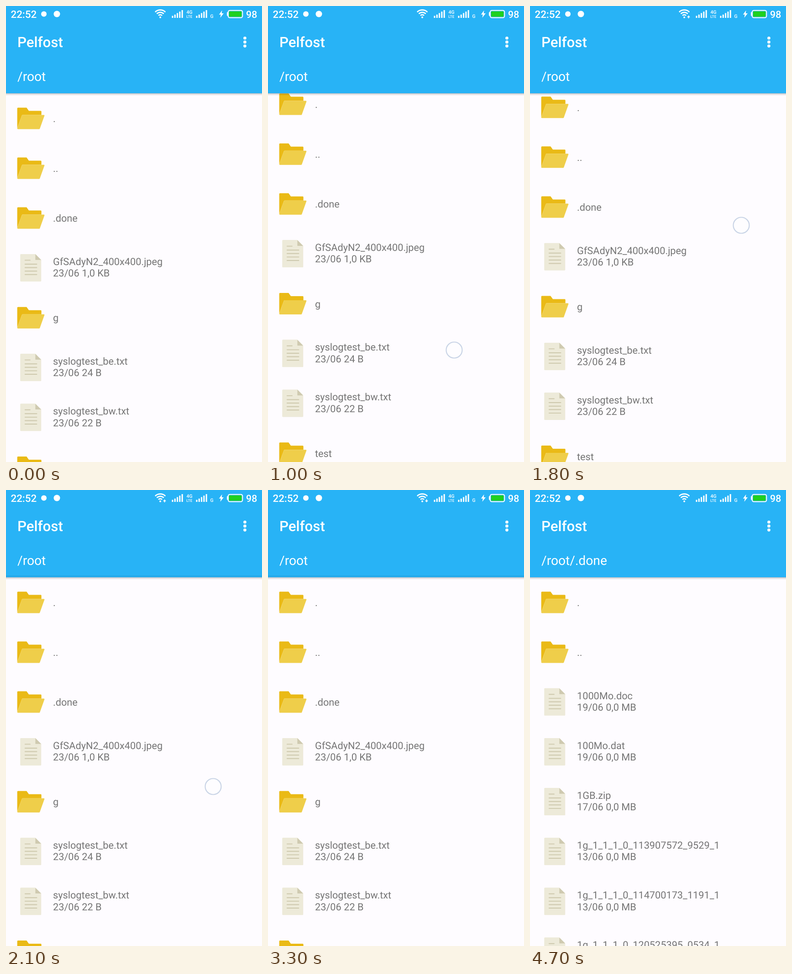
Recreate the animation shown at these times as an HTML page. Size 561 px wide and 998 px high, loop 5000 ms.

```html
<!DOCTYPE html>
<html lang="en">
<head>
<meta charset="utf-8">
<title>File list</title>
<style>
html, body { margin: 0; width: 100%; height: 100%; overflow: hidden; background: #fefcff; }
svg { display: block; width: 100vw; height: 100vh; }
text { font-family: Roboto, Arial, sans-serif; white-space: pre; text-rendering: geometricPrecision; }
.row text { font-size: 21.72px; fill: #757575; }
.bar text { fill: #fff; }
</style>
</head>
<body>
<svg viewBox="0 0 561 998" xmlns="http://www.w3.org/2000/svg">
  <defs>
    <linearGradient id="shade" x1="0" y1="0" x2="0" y2="1">
      <stop offset="0" stop-color="#000" stop-opacity=".3"/>
      <stop offset=".4" stop-color="#000" stop-opacity=".12"/>
      <stop offset="1" stop-color="#000" stop-opacity="0"/>
    </linearGradient>
    <g id="folder" transform="translate(24.6 -28.7)">
      <path fill="#eaba16" d="M51.5 12.5H25.500l-5-7H1.700C.8 5.500 0 6.300 0 7.200V50L.2 50 10.200 22.700Q10.700 21.500 11.700 21.500H53V14.200Q53 12.500 51.500 12.500z"/>
      <path fill="#efce4a" d="M48 52.500H1.600Q-.4 52.300 .1 50.500L10.200 22.700Q10.700 21.500 11.700 21.500H58.500Q60 21.600 59.600 23.300L49.600 51.300Q49 52.500 48 52.500z"/>
    </g>
    <g id="file" transform="translate(24.2 -30) scale(1.071)">
      <path fill="#edead9" d="M37 0H8Q6.5 0 6.5 1.5V55Q6.5 56 8 56H48Q49.5 56 49.5 55V12.500L37.500 .2z"/>
      <path fill="#cfcab0" d="M37.500 .2V12H49.400z"/>
      <path stroke="#cdc8ac" stroke-width="1.8" stroke-linecap="round" d="M16.400 12.600h10.400M16.400 20.600h24M16.400 27.700h24M16.400 34.800h24M16.400 41.900h24"/>
    </g>
    <path id="signal" fill="#fff" d="M0 21.500h3V26H0zM5.300 18.800h3V26h-3zM10.600 15.500h3V26h-3zM15.900 12.300h3V26h-3zM21.200 9h3V26h-3z"/>
  </defs>

  <rect width="561" height="998" fill="#fefcff"/>
  <g id="root" class="row"></g>
  <g id="done" class="row"></g>

  <g class="bar">
    <rect y="190.5" width="561" height="6" fill="url(#shade)"/>
    <rect width="561" height="191" fill="#28b3f6"/>
    <rect id="edge" y="187" width="561" height="3" fill="#25a9e8"/>

    <text x="10.5" y="25.7" font-size="22.3" font-weight="500">22:52</text>
    <circle cx="83" cy="17.5" r="6" fill="#fff"/>
    <circle cx="111.5" cy="17.5" r="7" fill="#fff"/>

    <path fill="none" stroke="#fff" stroke-width="2.6" d="M326.9 13.2A16 16 0 0 1 349.3 13.2M330.5 17A10.7 10.7 0 0 1 345.7 17M334.1 20.8A5.6 5.6 0 0 1 342.1 20.8"/>
    <circle cx="338.1" cy="24.7" r="2" fill="#fff"/>
    <path id="arrow" stroke="#28b3f6" stroke-width="1" paint-order="stroke" fill="#fff"/>
    <use href="#signal" x="363.5"/>
    <text x="402" y="17.3" font-size="10.5" font-weight="500" text-anchor="middle">4G</text>
    <text x="401.8" y="26" font-size="8" font-weight="500" text-anchor="middle">LTE</text>
    <use href="#signal" x="416.5"/>
    <text x="447.5" y="26.2" font-size="10.5" font-weight="500">G</text>
    <path fill="#fff" d="M473.5 9.5L466.8 18.8H470.8L469.5 25.8L477 16H472.7z"/>
    <rect x="484" y="13.5" width="3" height="8" rx="1" fill="#fff"/>
    <rect x="486.9" y="9.7" width="31.4" height="15.8" rx="3.5" fill="none" stroke="#fff" stroke-width="2"/>
    <rect x="489" y="11.7" width="27.3" height="11.8" rx="1.5" fill="#1fd01f"/>
    <text x="526" y="25.7" font-size="21.5" font-weight="500">98</text>

    <text x="25" y="90" font-size="31.2" font-weight="500">Pelfost</text>
    <text id="path" x="25" y="164" font-size="28.2"></text>
    <g fill="#fff">
      <circle cx="523.5" cy="70.2" r="3.3"/>
      <circle cx="523.5" cy="78.9" r="3.3"/>
      <circle cx="523.5" cy="87.6" r="3.3"/>
    </g>
  </g>

  <circle id="touch" r="17.5" fill="#fff" fill-opacity=".6" stroke="#c9d4e6" stroke-width="2.2"/>
</svg>

<script>
const LOOP = 5000, STEP = 100, OPEN = 3500;
const ROW = 109.1, FIRST = 245.6;
const el = id => document.getElementById(id);

// A row without details is a folder.
const parents = [['.'], ['..']];
const rootRows = [
  ...parents, ['.done'],
  ['GfSAdyN2_400x400.jpeg', '23/06 1,0 KB'],
  ['g'],
  ['syslogtest_be.txt', '23/06 24 B'],
  ['syslogtest_bw.txt', '23/06 22 B'],
  ['test']
];
const doneRows = [
  ...parents,
  ['1000Mo.doc', '19/06 0,0 MB'],
  ['100Mo.dat', '19/06 0,0 MB'],
  ['1GB.zip', '17/06 0,0 MB'],
  ['1g_1_1_1_0_113907572_9529_1', '13/06 0,0 MB'],
  ['1g_1_1_1_0_114700173_1191_1', '13/06 0,0 MB'],
  ['1g_1_1_1_0_120525395_0534_1', '13/06 0,0 MB']
];

function rowMarkup([name, details], i) {
  const label = (y, s) => `<text x="103" y="${y}">${s}</text>`;
  const body = details
    ? '<use href="#file"/>' + label(-6.2, name) + label(19.4, details)
    : '<use href="#folder"/>' + label(8.4, name);
  return `<g transform="translate(0 ${FIRST + i * ROW})">${body}</g>`;
}
el('root').innerHTML = rootRows.map(rowMarkup).join('');
el('done').innerHTML = doneRows.map(rowMarkup).join('');

// Keys are [time, value], joined by straight lines.
const scrollKeys = [[900, 0], [1000, 30.8], [1100, 65.8], [1600, 65.8], [1700, 52], [1800, 24.2], [1900, 0]];
const touchX = [[900, 403], [1000, 408], [1400, 452], [1600, 463], [1800, 463], [2100, 454], [2400, 448]];
const touchY = [[900, 790], [1000, 753], [1100, 660], [1200, 565], [1300, 493], [1400, 455],
  [1500, 441], [1600, 438], [1700, 452], [1800, 480], [1900, 533], [2000, 594], [2100, 649], [2400, 745]];

function at(keys, t) {
  if (t <= keys[0][0]) return keys[0][1];
  for (let i = 1; i < keys.length; i++) {
    const [t0, v0] = keys[i - 1], [t1, v1] = keys[i];
    if (t <= t1) return v0 + (v1 - v0) * (t - t0) / (t1 - t0);
  }
  return keys[keys.length - 1][1];
}

const within = (t, from, to) => t >= from && t < to;
const show = (id, on) => el(id).setAttribute('visibility', on ? 'visible' : 'hidden');
const move = (id, x, y) => el(id).setAttribute('transform', `translate(${x} ${y})`);

function arrowShape(t) {
  if (within(t, 1600, 2700)) return 'M344 24.5L347.5 20.5L351 24.5H348.5V27H346.5V24.5z';
  if (within(t, 2700, 4700)) return 'M344 23L347.5 27L351 23H348.5V20.5H346.5V23z';
  return '';
}

function draw(time) {
  const t = Math.floor(time / STEP) * STEP;
  const open = t >= OPEN;
  show('root', !open);
  show('done', open);
  el('path').textContent = open ? '/root/.done' : '/root';
  move('root', 0, -at(scrollKeys, t));
  show('touch', within(t, 900, 2500));
  move('touch', at(touchX, t), at(touchY, t));
  show('edge', within(t, 2000, OPEN));
  el('arrow').setAttribute('d', arrowShape(t));
}

const start = performance.now();
function tick() {
  draw((performance.now() - start) % LOOP);
  requestAnimationFrame(tick);
}
tick();
</script>
</body>
</html>
```
